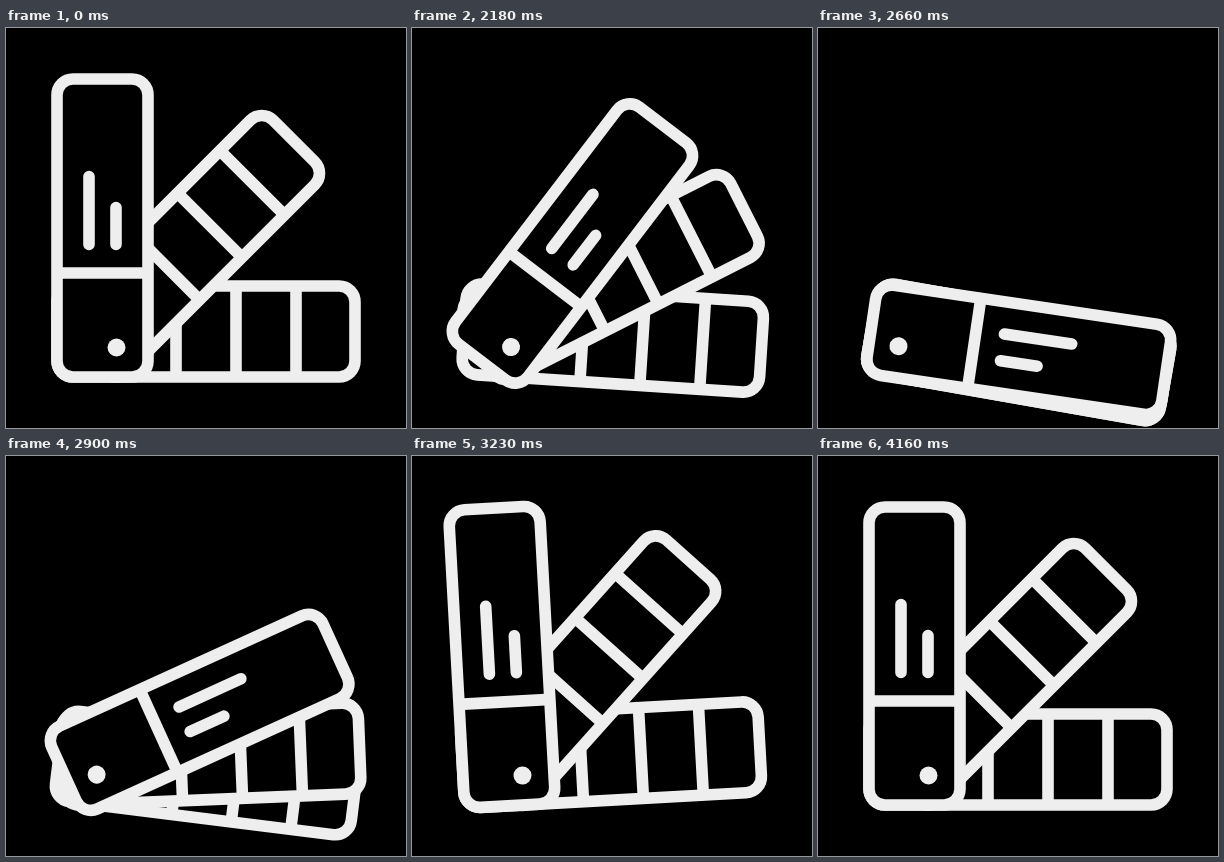
An HTML page that plays this animation: 400x400 px, repeating every 4.19 s.

```html
<!DOCTYPE html>
<html lang="en">
<head>
<meta charset="utf-8">
<title>Colour swatches</title>
<style>
html, body { margin: 0; height: 100%; overflow: hidden; background: #000; }
svg { display: block; width: 100vw; height: 100vh; }
.card { fill: #000; stroke: #eee; stroke-width: 11.6; }
.round { stroke-linecap: round; }
.dot { fill: #eee; stroke: none; }
</style>
</head>
<body>
<svg viewBox="0 0 400 400">
  <defs>
    <rect id="frame" x="-45.5" y="-45.5" width="298" height="91" rx="16"/>
    <g id="swatch">
      <use href="#frame"/>
      <path d="M73.5-45.5v91M133.5-45.5v91M193.5-45.5v91"/>
    </g>
  </defs>
  <!-- each card lies flat, with the middle of its square end at 0,0 -->
  <g id="fan" class="card">
    <use href="#swatch" transform="translate(96.5 303.5)"/>
    <use href="#swatch" id="middle"/>
    <g id="front">
      <use href="#frame"/>
      <path d="M58.5-45.5v91"/>
      <path class="round" d="M87-13.5H155M87 13.5H124"/>
      <circle class="dot" cx="-16" cy="14" r="9"/>
    </g>
  </g>
</svg>
<script>
const LOOP = 4190, START = 2000, STEP = 30;
const [fan, middle, front] = ["fan", "middle", "front"].map(id => document.getElementById(id));

const lerp = (a, b, p) => a + (b - a) * p;

// eased progress from time a to time b
function ease(t, a, b) {
  const x = Math.min(1, Math.max(0, (t - a) / (b - a)));
  return x * x * (3 - 2 * x);
}

// 0 = open, 1 = closed
const closed = (t, inDelay, outDelay) =>
  ease(t, inDelay, inDelay + 429) - ease(t, 730 + outDelay, 1165 + outDelay);

const tilt = t =>
  10 * ease(t, 0, 435) - 14 * ease(t, 725, 1320) + 5 * ease(t, 1320, 1710) - ease(t, 1710, 2100);

function draw(now) {
  const t = Math.max(0, Math.floor((now % LOOP - START) / STEP) * STEP);
  const a = closed(t, 0, 0), b = closed(t, 18, 42);
  const px = lerp(110.5, 80.5, a), py = lerp(319.5, 318.2, a);
  fan.setAttribute("transform", `rotate(${tilt(t)} ${px} ${py})`);
  middle.setAttribute("transform",
    `translate(${lerp(109.4, 96.5, b)} ${lerp(291.6, 303.5, b)}) rotate(${lerp(-45, 0, b)})`);
  front.setAttribute("transform",
    `translate(${px} ${py}) rotate(${88.4 * a}) translate(-14 -16) rotate(-90)`);
}

const t0 = performance.now();
function tick() {
  draw(performance.now() - t0);
  requestAnimationFrame(tick);
}
tick();
</script>
</body>
</html>
```
